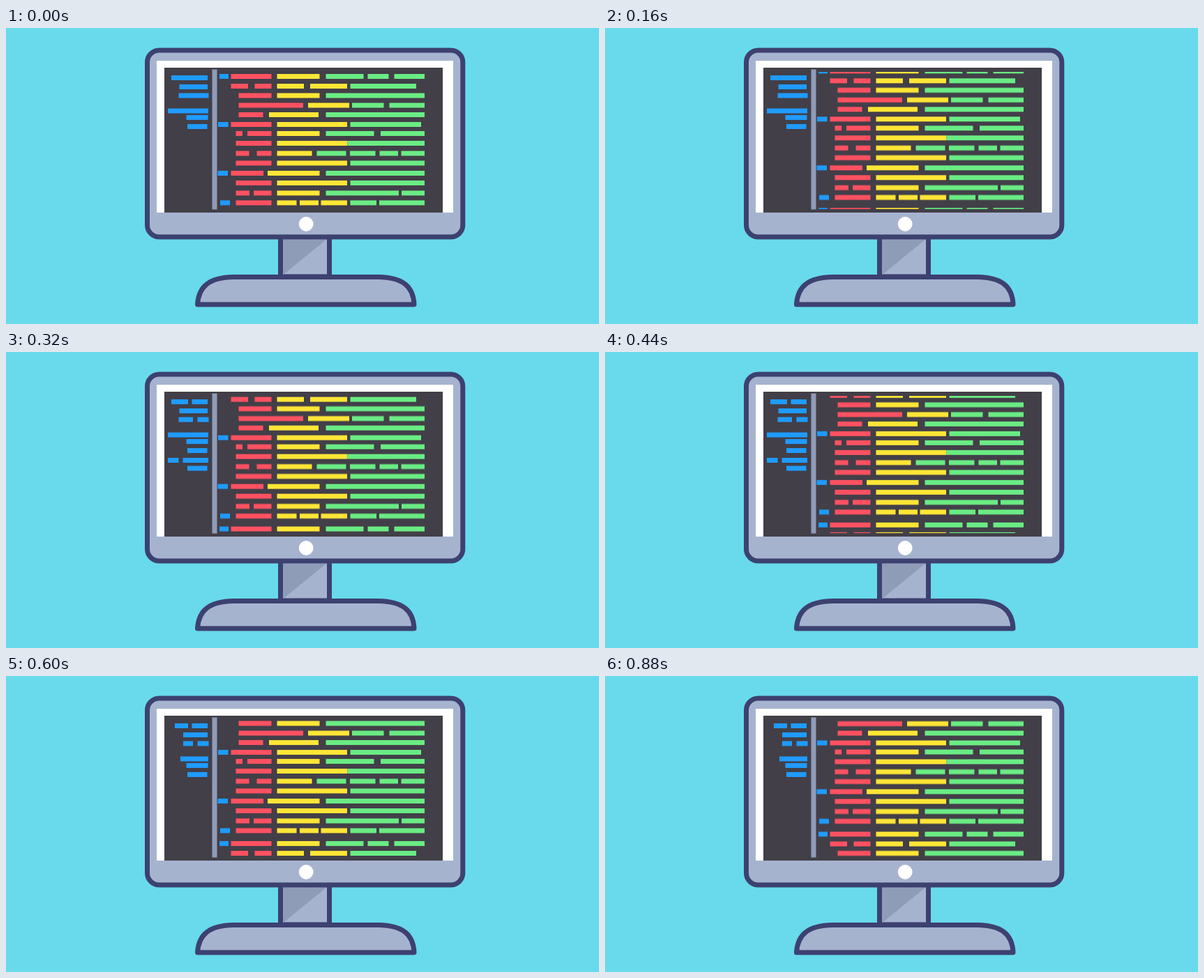
Write an HTML page that moves like this. It is 850 px wide and 425 px high and loops after 920 ms.

```html
<!DOCTYPE html>
<html lang="en">
<head>
<meta charset="utf-8">
<title>Scrolling code on a monitor</title>
<style>
html, body { margin: 0; width: 100%; height: 100%; overflow: hidden; background: #68daeb; }
svg { display: block; width: 850px; height: 425px; }
.edge { fill: #a6b3cf; stroke: #3c4170; stroke-width: 7; stroke-linejoin: round; }
.shade { fill: #8f9cb8; }
.b { fill: #1f9bff; }
.r { fill: #ff5161; }
.y { fill: #ffe636; }
.g { fill: #6aec84; }
</style>
</head>
<body>
<svg viewBox="0 0 850 425">
  <clipPath id="view"><rect x="303" y="63" width="300" height="197"/></clipPath>

  <rect class="edge" x="393.5" y="295" width="70" height="62"/>
  <path class="shade" d="M397 303H460L397 354.5Z"/>
  <path class="edge" d="M274.5 397C276 371 291 358 327 357.5H533C569 358 584 371 585 397Z"/>

  <rect class="edge" x="202.5" y="32" width="452.3" height="268" rx="17"/>
  <rect x="216" y="47" width="425" height="218" fill="#fff"/>
  <rect x="227" y="57" width="399" height="208" fill="#423f48"/>
  <circle cx="430.2" cy="281.5" r="10.4" fill="#fff"/>
  <rect class="shade" x="295.5" y="59.5" width="7" height="201"/>

  <g id="side"></g>
  <g clip-path="url(#view)"><g id="code"></g></g>
</svg>
<script>
const LOOP = 920, STEPS = 23, SHIFT = -44.43, PERIOD = 200, BAR = 7;

// Each line: vertical centre, then colour and horizontal extent of every bar.
const lines = `
69.5 b306-319 r322.5-380.5 y388.5-449.5 g458.5-512.5 g518.5-548.5 g556.5-600
83.5 r322.5-347 r356.5-380.5 y388.5-427 y436-489 g493.5-588
97 r333.5-380.5 y388.5-449.5 g458.5-600
111 r333.5-426 y433-492 g496-541.5 g549.5-600
124.5 r333.5-368.5 y377-448 g458.5-600
138.5 b304-318.5 r322.5-380.5 y388.5-489 g493.5-595
151.5 r329.5-339 r346-380.5 y388.5-449.5 g458.5-527.5 g537-600
165.5 r329.5-380.5 y388.5-489.5 g489.5-600
180 r329.5-348.5 r359.5-380.5 y388.5-438.5 g445.5-487.5 g493-529.5 g535.5-562 g566.5-600
194 r329.5-380.5 y388.5-489 g493.5-600
208.5 b303.5-318 r322.5-369 y375-449.5 g458.5-600
222.5 r329.5-380.5 y388.5-489 g493.5-600
237 r329.5-349 r355-380.5 y388.5-449.5 g458.5-563 g567-600
251 b307-321 r329.5-380.5 y388.5-416.5 y421-448 y451.5-489 g493.5-531 g535-600`;

// Sidebar entries; the gap opens in the second state, "tight" is the left edge in the third.
const entries = [
  { y: 71.5, x: 237, end: 289, gap: [261, 266.5], tight: 242 },
  { y: 84.5, x: 248.5, end: 289, tight: 254 },
  { y: 97, x: 247.5, end: 290.5, gap: [268, 274.5], tight: 254 },
  { y: 119, x: 232, end: 290, tight: 250 },
  { y: 128.5, x: 258.5, end: 289.5 },
  { y: 141.5, x: 260, end: 288.5 },
  { y: 155.5, x: 232, end: 290, gap: [247.5, 253.5], only: 1 },
  { y: 167, x: 260, end: 288.5, only: 1 },
];
const switches = [0, 7 / STEPS, 14 / STEPS];

const timing = { duration: LOOP, iterations: Infinity };
const code = document.getElementById("code");
const side = document.getElementById("side");

function add(parent, tag, attrs = {}) {
  const el = document.createElementNS("http://www.w3.org/2000/svg", tag);
  for (const key in attrs) el.setAttribute(key, attrs[key]);
  return parent.appendChild(el);
}

function bar(parent, color, y, from, to) {
  add(parent, "rect", { class: color, x: from, y: y - BAR / 2, width: to - from, height: BAR });
}

for (const line of lines.trim().split("\n")) {
  const [y, ...bars] = line.split(" ");
  for (const item of bars) {
    const [from, to] = item.slice(1).split("-").map(Number);
    bar(code, item[0], +y, from, to);
    bar(code, item[0], +y + PERIOD, from, to);
  }
}

switches.forEach((_, state) => {
  const group = add(side, "g", { opacity: state ? 0 : 1 });
  for (const { y, x, end, gap, tight, only = state } of entries) {
    if (only !== state) continue;
    const left = state === 2 && tight || x;
    if (state && gap) {
      bar(group, "b", y, left, gap[0]);
      bar(group, "b", y, gap[1], end);
    } else {
      bar(group, "b", y, left, end);
    }
  }
  const frames = switches.map((offset, i) => ({ offset, opacity: +(i === state), easing: "step-end" }));
  frames.push({ offset: 1, opacity: +(state === 2) });
  group.animate(frames, timing);
});

code.animate(
  { transform: ["translateY(0px)", `translateY(${SHIFT}px)`] },
  { ...timing, easing: `steps(${STEPS}, end)` }
);
</script>
</body>
</html>
```
